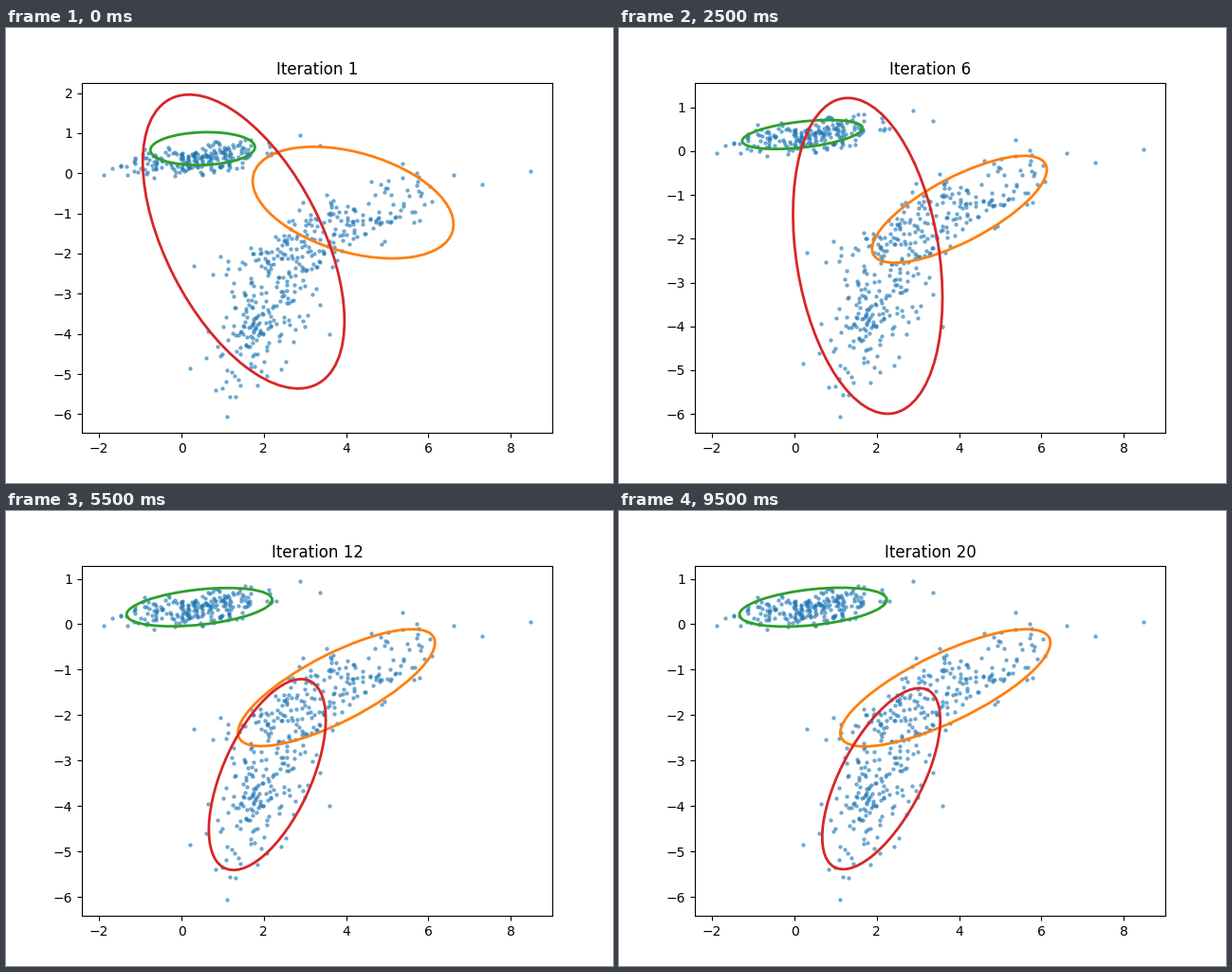
Recreate the animation shown at these times as a matplotlib script. Size 640 by 480 pixels, loop 10000 ms.

```python
import numpy as np
import matplotlib.pyplot as plt
from matplotlib.animation import FuncAnimation
from matplotlib.patches import Ellipse

ITERATIONS = 20


class Component:
    """A contour that moves through a few poses, then settles on a limit.

    A pose is (centre x, centre y, half width, half height, correlation).
    """

    def __init__(self, color, count, poses, limit, rates):
        self.color = color
        self.count = count
        self.times = list(poses)
        self.poses = np.array(list(poses.values()))
        self.limit = np.array(limit)
        self.rates = np.array(rates)

    def pose(self, t):
        moving = np.array([np.interp(t, self.times, column)
                           for column in self.poses.T])
        elapsed = max(t - self.times[-1], 0)
        return self.limit + (moving - self.limit) * np.exp(-self.rates * elapsed)

    def contour(self, t):
        cx, cy, sx, sy, rho = self.pose(t)
        cov = [[sx**2, rho * sx * sy], [rho * sx * sy, sy**2]]
        values, vectors = np.linalg.eigh(cov)
        width, height = 2 * np.sqrt(values)
        angle = np.degrees(np.arctan2(vectors[1, 0], vectors[0, 0]))
        return Ellipse((cx, cy), width, height, angle=angle, fill=False,
                       edgecolor=self.color, linewidth=2, zorder=2)

    def sample(self, rng):
        """Gaussian points with the far tail cut; the contour is two sigma."""
        cx, cy, sx, sy, rho = self.limit
        radius = 0.5 * np.sqrt(-2 * np.log(1 - 0.94 * rng.random(self.count)))
        theta = rng.uniform(0, 2 * np.pi, self.count)
        u, v = radius * np.cos(theta), radius * np.sin(theta)
        return np.column_stack([cx + sx * u,
                                cy + sy * (rho * u + np.sqrt(1 - rho**2) * v)])


COMPONENTS = [
    Component("tab:orange", 175,
              {1: (4.17, -0.73, 2.44, 1.39, -0.39),
               4: (4.16, -1.20, 1.98, 1.10, 0.69)},
              limit=(3.63, -1.40, 2.65, 1.29, 0.77),
              rates=(0.17, 0.5, 0.12, 0.5, 0.5)),
    Component("tab:green", 210,
              {1: (0.515, 0.614, 1.27, 0.41, 0.09),
               4: (0.18, 0.433, 1.14, 0.254, 0.35),
               6: (0.19, 0.381, 1.46, 0.331, 0.44)},
              limit=(0.453, 0.376, 1.79, 0.428, 0.38),
              rates=0.45),
    Component("tab:red", 200,
              {1: (1.51, -1.70, 2.45, 3.66, -0.54),
               4: (1.47, -1.74, 2.27, 3.84, -0.505),
               6: (1.78, -2.39, 1.815, 3.605, -0.265),
               8: (2.01, -3.10, 1.385, 2.66, 0.36)},
              limit=(2.11, -3.41, 1.435, 1.99, 0.65),
              rates=(0.35, 0.28, 0.3, 0.45, 0.35)),
]

# Isolated points, which also fix the axis limits
OUTLIERS = [(-1.9, -0.04), (-1.68, 0.13), (8.49, 0.05), (7.3, -0.27),
            (6.62, -0.04), (5.37, 0.25), (2.88, 0.94), (3.37, 0.69),
            (1.1, -6.07), (0.2, -4.86), (0.3, -2.31), (3.6, -4.0)]

rng = np.random.default_rng(4)
points = np.vstack([OUTLIERS] + [c.sample(rng) for c in COMPONENTS])

fig, ax = plt.subplots(figsize=(6.4, 4.8), dpi=100)


def draw(frame):
    iteration = frame + 1
    ax.clear()
    ax.scatter(points[:, 0], points[:, 1], s=5, color="tab:blue", alpha=0.5)
    for component in COMPONENTS:
        ax.add_patch(component.contour(iteration))
    ax.set_title(f"Iteration {iteration}")


animation = FuncAnimation(fig, draw, frames=ITERATIONS, interval=500,
                          init_func=lambda: None, repeat=True, repeat_delay=0)
plt.show()
```
